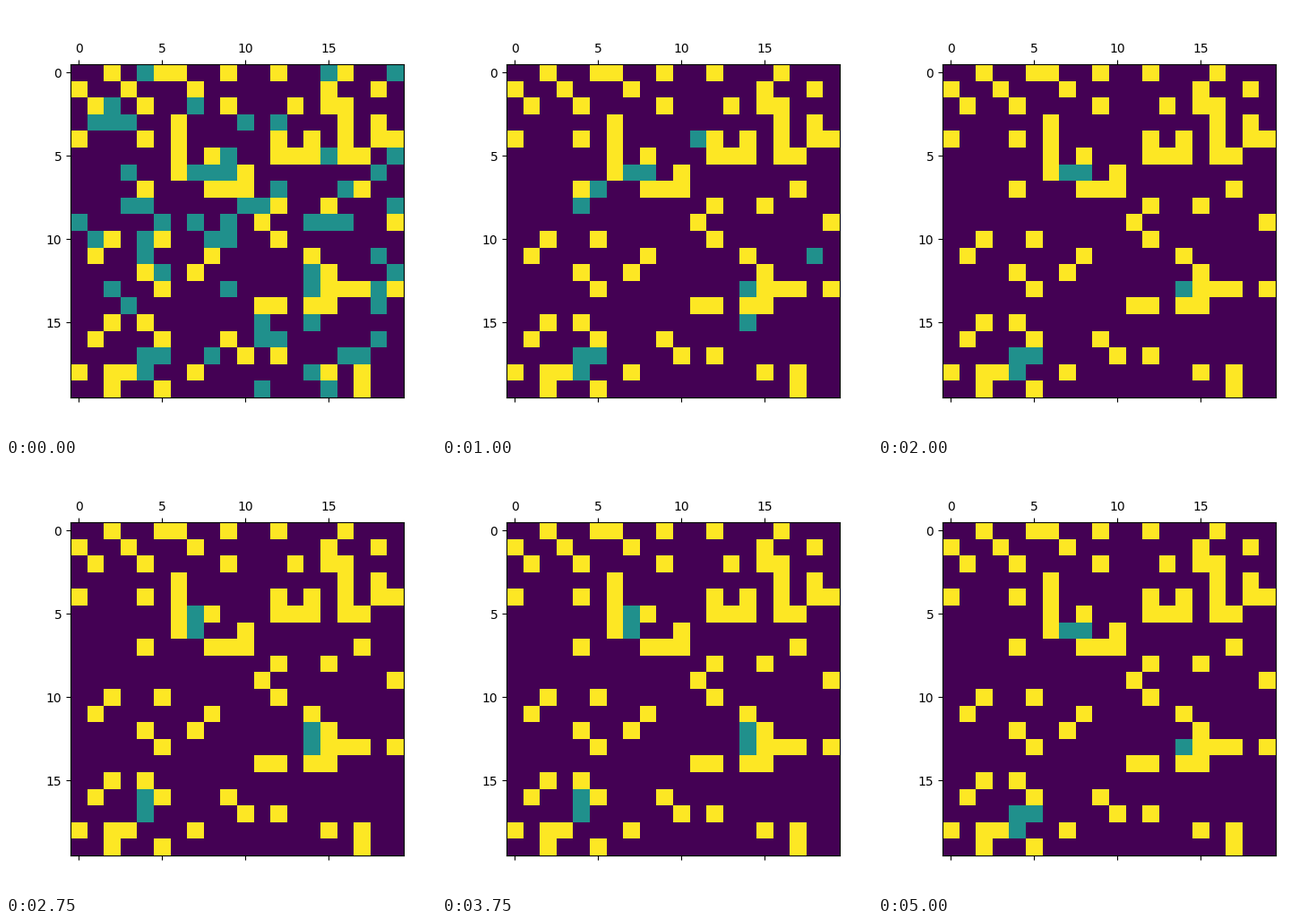
A matplotlib script for the animation above (5250 ms loop, 480x480 px).

```python
import random

import numpy as np
import matplotlib.pyplot as plt
from matplotlib.animation import FuncAnimation

SIZE, FRAMES, INTERVAL = 20, 21, 250
WALKER, WALL = 1, 2
CROWD, SURVIVAL = 55, 0.55

# The maze: blocked columns, row by row
MAZE = [
    [2, 5, 6, 9, 12, 16], [0, 3, 7, 15, 18], [1, 4, 9, 13, 15, 16],
    [6, 16, 18], [0, 4, 6, 12, 14, 16, 18, 19], [6, 8, 12, 13, 14, 16, 17],
    [6, 10], [4, 8, 9, 10, 17], [12, 15], [11, 19], [2, 5, 12], [1, 8, 14],
    [4, 7, 15], [5, 15, 16, 17, 19], [11, 12, 14, 15], [2, 4], [1, 5, 9],
    [10, 12], [0, 2, 3, 7, 15, 17], [2, 5, 17],
]
walls = {(r, c) for r, cols in enumerate(MAZE) for c in cols}

MOVES = {"U": (-1, 0), "D": (1, 0), "L": (0, -1), "R": (0, 1)}

# Walkers that return to their start every four moves
LOOPERS = [
    ((6, 7), "UUDD"), ((6, 8), "LUDR"), ((13, 14), "RURD"), ((13, 14), "UUDD"),
    ((17, 4), "LRUD"), ((17, 5), "LUDR"), ((18, 4), "UUDD"),
]


def walk(pos, route):
    """Follow the route; a wall or the border blocks a move."""
    for move in route:
        dr, dc = MOVES[move]
        nxt = pos[0] + dr, pos[1] + dc
        if nxt not in walls and 0 <= min(nxt) and max(nxt) < SIZE:
            pos = nxt
    return pos


def make_crowd():
    rng = random.Random(4)
    taken = walls | {pos for pos, _ in LOOPERS}
    free = [(r, c) for r in range(SIZE) for c in range(SIZE)
            if (r, c) not in taken]
    return [(pos, rng.choices("UDLR", k=FRAMES))
            for pos in rng.sample(free, CROWD)]


crowd = make_crowd()


def state(step):
    grid = np.zeros((SIZE, SIZE), int)
    for cell in walls:
        grid[cell] = WALL
    for pos, route in LOOPERS:
        grid[walk(pos, route[:step % 4])] = WALKER
    # The wanderers die off geometrically
    alive = int(CROWD * SURVIVAL ** step)
    for pos, route in crowd[:alive]:
        grid[walk(pos, route[:step])] = WALKER
    return grid


fig = plt.figure(figsize=(4.8, 4.8), dpi=100)
ax = fig.add_axes((0.15, 0.09, 0.775, 0.775))
image = ax.matshow(state(0), cmap="viridis", vmin=0, vmax=WALL)


def update(step):
    image.set_data(state(step))
    return [image]


anim = FuncAnimation(fig, update, frames=FRAMES, interval=INTERVAL,
                     repeat=True, repeat_delay=0)
plt.show()
```
